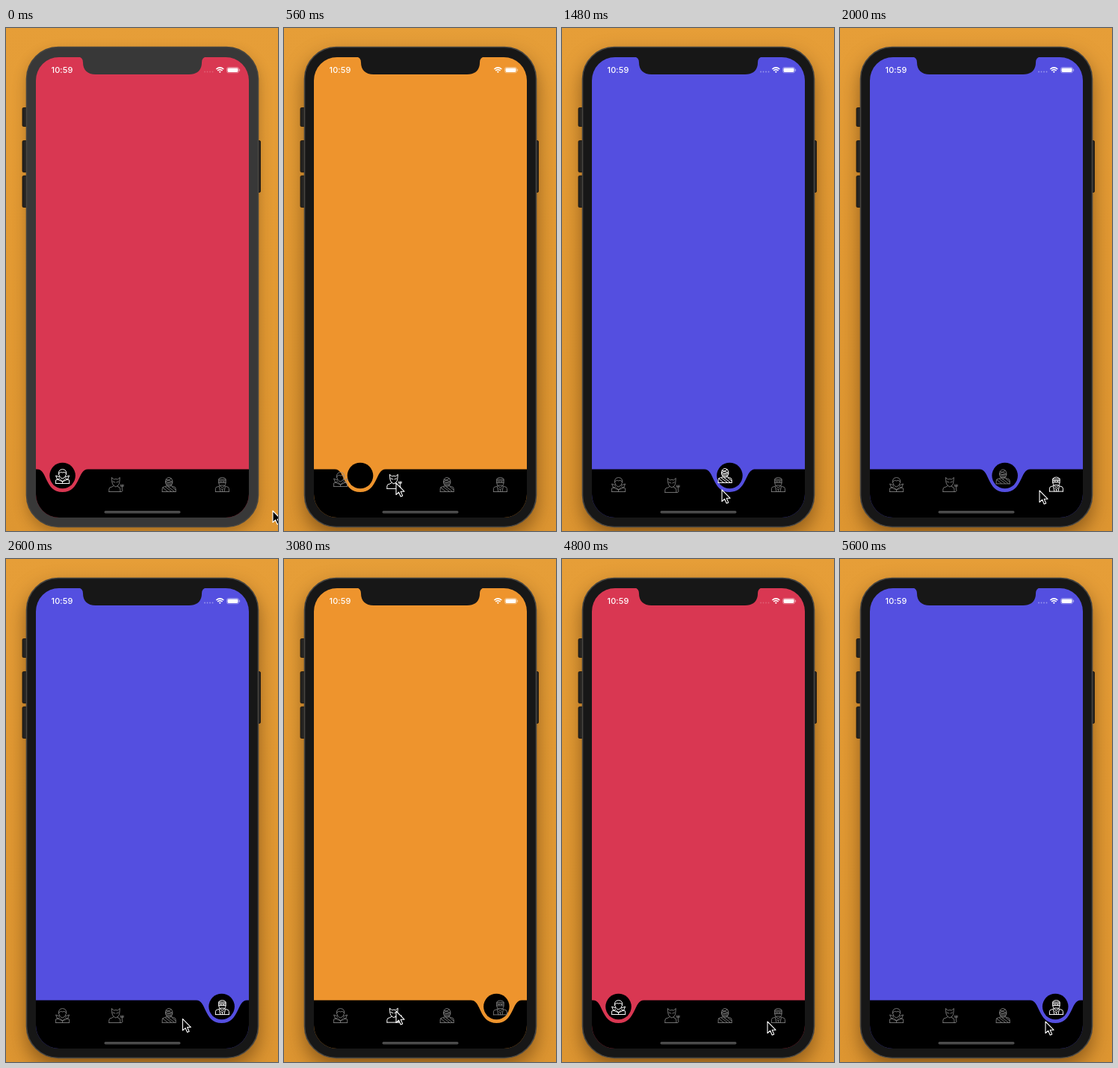
Write an HTML page that moves like this. It is 364x672 px and loops after 5.64 s.

```html
<!DOCTYPE html>
<html lang="en">
<head>
<meta charset="utf-8">
<title>Tab bar</title>
<style>
html, body { margin: 0; width: 100%; height: 100%; overflow: hidden; background: #e59c35; }
#stage { position: relative; width: 364px; height: 672px; overflow: hidden;
  background: linear-gradient(#e69e38, #e39a33 40%, #de9631); }
#shade { position: absolute; left: 27px; top: 25px; width: 311px; height: 642px; border-radius: 43px;
  box-shadow: 0 12px 26px rgba(60,30,0,.5); }
#shade.idle { box-shadow: 0 8px 18px rgba(60,30,0,.32); }
svg { position: absolute; left: 0; top: 0; display: block; }
.icon { fill: none; stroke: #858585; stroke-width: .85; stroke-linejoin: round; stroke-linecap: round; }
.icon.on { stroke: #fff; stroke-width: 1; }
.time { font: 500 11px Inter, "Liberation Sans", sans-serif; fill: #fff; letter-spacing: .1px; }
</style>
</head>
<body>
<div id="stage">
<div id="shade"></div>
<svg width="364" height="672" viewBox="0 0 364 672">
  <defs><clipPath id="screen"><rect x="40" y="39" width="285" height="615" rx="31"/></clipPath></defs>
  <g fill="#252321" stroke="#11100f" stroke-width=".8">
    <rect x="22" y="106.500" width="7" height="25" rx="1.500"/>
    <rect x="22" y="150.500" width="7" height="42" rx="1.500"/>
    <rect x="22" y="197.500" width="7" height="42" rx="1.500"/>
    <rect x="335" y="150.500" width="5.500" height="69" rx="1.500"/>
  </g>
  <rect id="bezel" x="27.500" y="25.500" width="310" height="641" rx="42.500" stroke="#474541" stroke-width="1.600"/>
  <g clip-path="url(#screen)">
    <rect id="page" x="40" y="39" width="285" height="615"/>
    <path id="bar"/>
    <circle id="knob" r="17.300"/>
    <g id="icons"></g>
    <rect x="131.500" y="645" width="102" height="3.400" rx="1.700" fill="#4b4b4b"/>
  </g>
  <path id="notch" d="M96 38 Q103 39 103 46 C103 56 109 62 120 62 H245 C256 62 262 56 262 46 Q262 39 269 38 Z"/>
  <text class="time" x="60.500" y="60">10:59</text>
  <g id="dots" fill="#fff" fill-opacity=".4">
    <circle cx="266" cy="58.500" r=".9"/><circle cx="269.500" cy="58.500" r=".9"/>
    <circle cx="273" cy="58.500" r=".9"/><circle cx="276.500" cy="58.500" r=".9"/>
  </g>
  <g fill="none" stroke="#fff" stroke-width="1.600">
    <path d="M281.300 55 Q286.300 50.600 291.300 55 M283 57 Q286.300 54.200 289.600 57"/>
    <path d="M286.300 60 L284.700 58.300 Q286.300 57 287.900 58.300 Z" fill="#fff" stroke="none"/>
  </g>
  <rect x="295.500" y="52.500" width="16" height="7.400" rx="2.200" fill="none" stroke="#fff" stroke-opacity=".45" stroke-width=".8"/>
  <rect x="296.500" y="53.400" width="14" height="5.600" rx="1.400" fill="#fff"/>
  <path d="M312.600 54.800 V57.600" stroke="#fff" stroke-opacity=".5"/>
  <path id="cursor" d="M0 0 V15.500 L3.600 12.200 L6.200 18 L8.700 16.900 L6.200 11.200 H11 Z" fill="#000" stroke="#fff" stroke-width="1.100" stroke-linejoin="round"/>
</svg>
</div>
<script>
const LOOP = 5640, RED = '#d93752', ORANGE = '#ee942d', BLUE = '#544fe0';
const pages = [RED, ORANGE, BLUE, BLUE];
// [time, tab]
const taps = [[-2000, 0], [480, 1], [1240, 2], [1980, 3], [3060, 1], [4000, 0], [4920, 3]];
// [time, x, y] of the pointer tip
const trail = [[0, 357, 645], [40, 357, 645], [440, 150, 608], [640, 150, 608], [920, 193, 617], [1080, 214, 617],
  [1480, 214, 617], [1800, 267, 618], [2400, 267, 618], [3000, 150, 604], [3560, 150, 604],
  [3920, 93, 605], [4300, 93, 605], [4760, 275, 618], [LOOP, 275, 618]];

const shoulders = 'M-9 9.500 V5.500 Q-9 3 -5.500 2.600 L-2.500 1.500 M9 9.500 V5.500 Q9 3 5.500 2.600 L2.500 1.500 M-9 9.500 H9';
const art = [
  'M-9 9.500 V5 L-4 3 M9 9.500 V5 L4 3 M-9 9.500 H9 M-5 -3 V-6 Q-4 -9.500 0 -9.500 Q4 -9.500 5 -6 V-3 Q4 2 0 3 Q-4 2 -5 -3 ' +
  'M-5 -4 Q-2 -7 0 -5 Q2 -7 5 -4 M-4 1 L-9 -1 L-7 4 L0 7 L7 4 L9 -1 L4 1 M0 7 V9.500 M-3 4 L0 7 L3 4',
  'M-9 9.500 V6 Q-9 3.500 -5 3 L-2.500 1.500 M6 9.500 V6 Q6 3.500 3 3 L2.500 1.500 M-9 9.500 H8 Q10 8 8.500 6 V0 M6.800 2 V0 M10.200 2 V0 M6.800 2 H10.200 ' +
  'M-5 -4 L-5.500 -9.500 L-2.500 -7 Q0 -8 2.500 -7 L5.500 -9.500 L5 -4 Q5 1 0 3 Q-5 1 -5 -4 M-3.500 -4 L-1 -3 M3.500 -4 L1 -3',
  shoulders + ' M-4.700 -4 A4.700 5.500 0 0 1 4.700 -4 Q4.700 1 0 3 Q-4.700 1 -4.700 -4 M-4 -7 L4 -4 M-4.700 -4 L3 -8 M-4.700 -3 H4.700 ' +
  'M-4 -1 L3 1.500 M4 -1 L-3 2 M-2 -2 H2 M-8.500 4 L-2 9 M-5 3 L3 9 M-1 3 L7 9 M4 3 L9 7',
  shoulders + ' M-4.700 -3 V-7 Q-4 -9.500 0 -9.500 Q4 -9.500 4.700 -7 V-3 Q4.500 2 0 4 Q-4.500 2 -4.700 -3 M-4.700 -7 H4.700 M-4.700 -5 H4.700 M-4.700 -2.500 H4.700 ' +
  'M-2.500 -4 H-1 M1 -4 H2.500 M-2 1 H2 M-4 3 L-2.500 9.500 M4 3 L2.500 9.500 M-2 5 L0 7 L2 5 M0 7 V9.500'
];

const $ = id => document.getElementById(id);
const set = (el, props) => { for (const k in props) el.setAttribute(k, props[k]); };
const tabX = i => 40 + 71.25 * (i + .5);
const icons = art.map(d => {
  const p = document.createElementNS('http://www.w3.org/2000/svg', 'path');
  p.setAttribute('d', d);
  return $('icons').appendChild(p);
});

// Underdamped spring from 0 to 1
function spring(ms) {
  const t = ms / 1000, decay = 7.64, w = 11;
  return t > .9 ? 1 : 1 - Math.exp(-decay * t) * (Math.cos(w * t) + decay / w * Math.sin(w * t));
}

function pointer(t) {
  const i = trail.findIndex(p => p[0] > t), [t0, x0, y0] = trail[i - 1], [t1, x1, y1] = trail[i];
  const u = (t - t0) / (t1 - t0), e = u * u * (3 - 2 * u);
  return [x0 + (x1 - x0) * e, y0 + (y1 - y0) * e];
}

function draw() {
  const t = performance.now() % LOOP;
  const n = taps.findLastIndex(p => p[0] <= t), [start, tab] = taps[n];
  const last = n ? taps[n - 1][1] : tab, s = spring(t - start);
  const x = tabX(last) + (tabX(tab) - tabX(last)) * s;
  const idle = n === 0, frame = idle ? '#383838' : '#171717';

  set($('bezel'), { fill: frame });
  set($('notch'), { fill: frame });
  $('shade').className = idle ? 'idle' : '';
  set($('page'), { fill: pages[tab] });
  set($('dots'), { opacity: pages[tab] === BLUE ? 1 : pages[tab] === RED ? .5 : 0 });
  set($('bar'), { d: `M-40 589.5 H${x - 34} c14 0 10 30.500 34 30.500 s20 -30.500 34 -30.500 H400 V660 H-40 Z` });
  set($('knob'), { cx: x, cy: 598 });
  icons.forEach((icon, i) => {
    const lift = i === tab ? (n ? s : 1) : i === last ? 1 - s : 0;
    set(icon, { class: i === tab ? 'icon on' : 'icon', transform: `translate(${tabX(i)} ${610 - 11 * lift})` });
  });
  set($('cursor'), { transform: `translate(${pointer(t)})` });
  requestAnimationFrame(draw);
}
draw();
</script>
</body>
</html>
```
